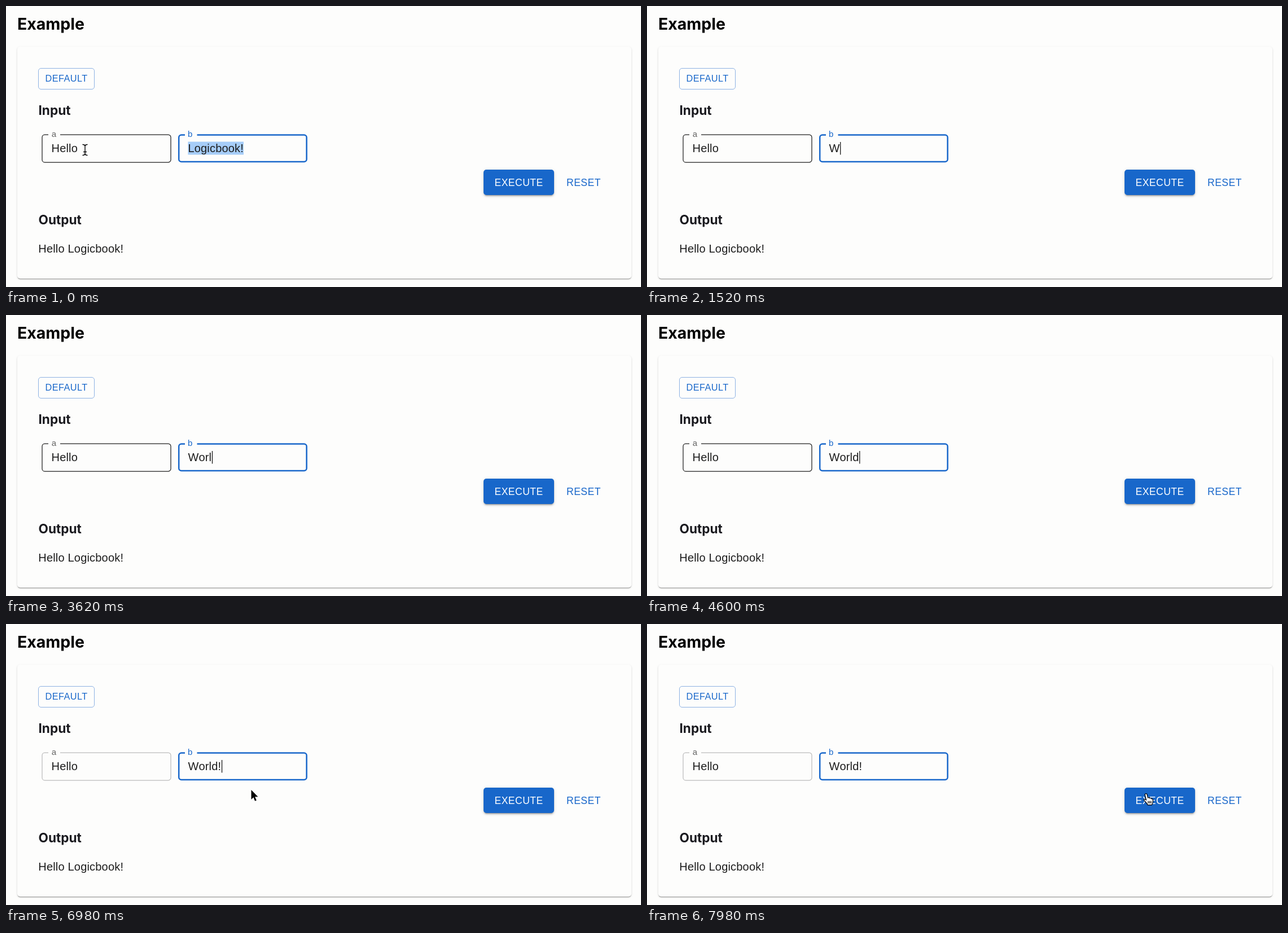
Write an HTML page that moves like this. It is 1125 px wide and 498 px high and loops after 8000 ms.

```html
<!DOCTYPE html>
<html lang="en">
<head>
<meta charset="utf-8">
<title>Example</title>
<style>
  html, body { margin: 0; width: 100%; height: 100%; overflow: hidden; background: #fdfdfc; }
  body { position: relative; --blue: #1867ca; }
  div, svg { position: absolute; box-sizing: border-box; }
  svg { left: 0; top: 0; width: 1125px; height: 498px; }
  .card {
    left: 20px; top: 72px; width: 1087.5px; height: 410.5px; border-radius: 5px; background: #fdfdfc;
    box-shadow: 0 2.5px 1.25px -1.25px #0003, 0 1.25px 1.25px #00000024, 0 1.25px 3.75px #0000001f;
  }
  .default {
    left: 57px; top: 110px; width: 99.5px; height: 37.5px;
    border: 1.25px solid #8eb2e3; border-radius: 5px;
  }
  .execute {
    left: 845.5px; top: 290px; width: 125.5px; height: 45px; border-radius: 5px; background: var(--blue);
    box-shadow: 0 3.75px 1.25px -2.5px #0003, 0 2.5px 2.5px #00000024, 0 1.25px 6.25px #0000001f;
  }
  text { font-family: "Liberation Sans", Arial, sans-serif; white-space: pre; }
  .heading { font: 700 22.6px Inter, sans-serif; font-optical-sizing: none; fill: #1a1a1f; }
  .title { font-size: 28.5px; fill: #000; }
  .body { font-size: 20px; letter-spacing: .1876px; font-kerning: none; fill: #1d1d1d; }
  .label { font-size: 15px; letter-spacing: .14px; }
  .button { font-size: 17.5px; letter-spacing: .5px; }
  .small { font-size: 16.25px; letter-spacing: .46px; }
  .blue { fill: var(--blue); }
  .outline { fill: none; }
</style>
</head>
<body>
<div class="card"></div>
<div class="default"></div>
<div class="execute"></div>
<svg viewBox="0 0 1125 498">
  <text class="heading title" x="20" y="42">Example</text>
  <text class="small blue" x="69.5" y="134.3">DEFAULT</text>
  <text class="heading" x="57.5" y="193">Input</text>
  <text class="heading" x="57.5" y="387">Output</text>

  <path id="outlineA" class="outline" stroke-width="1.25"/>
  <path id="outlineB" class="outline" stroke="#1867ca" stroke-width="2.5"/>
  <text class="label" x="80.8" y="231.5" fill="#666">a</text>
  <text class="label blue" x="322" y="231.5">b</text>
  <rect id="selection" x="322.4" y="240.5" width="98.6" height="23" fill="#a6cdf8"/>
  <text class="body" x="80.5" y="258.7">Hello</text>
  <text class="body" id="valueB" x="322.4" y="258.7"></text>
  <rect id="caret" y="241" width="1.25" height="22.5" fill="#111"/>

  <text class="button" x="865.5" y="319" fill="#fff">EXECUTE</text>
  <text class="button blue" x="993" y="319">RESET</text>
  <text class="body" x="57.3" y="436.5">Hello Logicbook!</text>

  <g id="cursor" stroke-linejoin="round" stroke-linecap="round">
    <g id="beam" fill="none">
      <path id="beamShape" stroke="#fff" stroke-width="3.2"
        d="M-4-9.5Q-.5-9.5 0-7Q.5-9.5 4-9.5M0-7V7M-4 9.5Q-.5 9.5 0 7Q.5 9.5 4 9.5M-2.5 3.5H2.5"/>
      <use href="#beamShape" style="--x:0"/>
    </g>
    <path id="arrow" fill="#000" stroke="#fff" stroke-width="1.6" paint-order="stroke"
      d="M.7.5V17.5L4.6 13.8L7.3 20.2L10 19L7.3 12.8H12.6Z"/>
    <g id="hand" transform="translate(-5.5 0)" stroke="#000" stroke-width="1.25">
      <path fill="#fff" d="M3.6 2.2C4.4 0 7 .3 7.5 2.4L8.9 8.2C10 7 12 7.6 12.3 8.8C13.6 7.9 15 8.6 15.3 9.9
        C16.6 9.4 17.8 10.3 17.8 11.8L17.6 15.5Q17.2 18 16 20.5H8.4Q7.6 18.2 5.4 16L2.3 12.6
        C1.2 11.2 2.9 9.8 4.4 10.8L5.9 12Z"/>
      <path d="M9.5 14V17.5M12 14V17.5M14.4 14V17.5"/>
    </g>
  </g>
</svg>
<script>
const LOOP = 8000, BLINK = 1200;
const $ = id => document.getElementById(id);

// [time, value of field b]
const typing = [[0, "Logicbook!"], [1260, "W"], [1860, "Wo"], [2240, "Wor"], [2580, "Worl"],
  [3780, "World"], [5900, "World!"]];
// [time, x, y]
const moves = [[6720, 140, 255], [6860, 290, 272], [6980, 433.5, 293.5], [7200, 498, 296],
  [7440, 516, 296], [7540, 522, 296], [7740, 690, 297], [7900, 850, 299], [7980, 884, 300]];

function outline(x0, x1, y0, y1, gap0, gap1, r = 4.5) {
  const arc = (x, y) => `a${r} ${r} 0 0 1 ${x} ${y}`;
  return `M${gap1} ${y0}H${x1 - r}${arc(r, r)}V${y1 - r}${arc(-r, r)}` +
    `H${x0 + r}${arc(-r, -r)}V${y0 + r}${arc(r, -r)}H${gap0}`;
}

function position(t) {
  const next = moves.findIndex(m => m[0] > t);
  if (next === 0) return moves[0].slice(1);
  if (next < 0) return moves.at(-1).slice(1);
  const [t0, x0, y0] = moves[next - 1], [t1, x1, y1] = moves[next];
  const k = (t - t0) / (t1 - t0);
  return [x0 + (x1 - x0) * k, y0 + (y1 - y0) * k];
}

const inside = (x, y, x0, y0, x1, y1) => x >= x0 && x <= x1 && y >= y0 && y <= y1;
const show = (id, on) => $(id).setAttribute("visibility", on ? "visible" : "hidden");

function render(t) {
  const [typedAt, value] = typing.findLast(step => step[0] <= t);
  const selected = typedAt === 0;
  const field = $("valueB");
  if (field.textContent !== value) field.textContent = value;
  show("selection", selected);
  show("caret", !selected && Math.floor((t - typedAt) / BLINK) % 2 === 0);
  $("caret").setAttribute("x", 323 + field.getComputedTextLength());

  const [x, y] = position(t);
  const overA = inside(x, y, 63, 227, 293, 278);
  const overB = inside(x, y, 305, 227, 534, 278);
  const overButton = inside(x, y, 845, 290, 971, 335);
  const visible = selected || t >= moves[0][0];
  $("outlineA").setAttribute("stroke", overA ? "#1f1f1f" : "#bcbcbc");
  $("cursor").setAttribute("transform", `translate(${x} ${y})`);
  show("beam", visible && (overA || overB));
  show("hand", visible && overButton);
  show("arrow", visible && !overA && !overB && !overButton);
}

$("outlineA").setAttribute("d", outline(64, 292, 228.2, 277, 75, 96));
$("outlineB").setAttribute("d", outline(306.2, 532.6, 228.6, 276, 317, 338.5));

// Dark core of the text cursor over its white halo
const core = $("beamShape").cloneNode();
core.removeAttribute("id");
core.setAttribute("stroke", "#000");
core.setAttribute("stroke-width", 1.4);
$("beam").querySelector("use").replaceWith(core);

const start = performance.now();
function frame() {
  render((performance.now() - start) % LOOP);
  requestAnimationFrame(frame);
}
frame();
</script>
</body>
</html>
```
